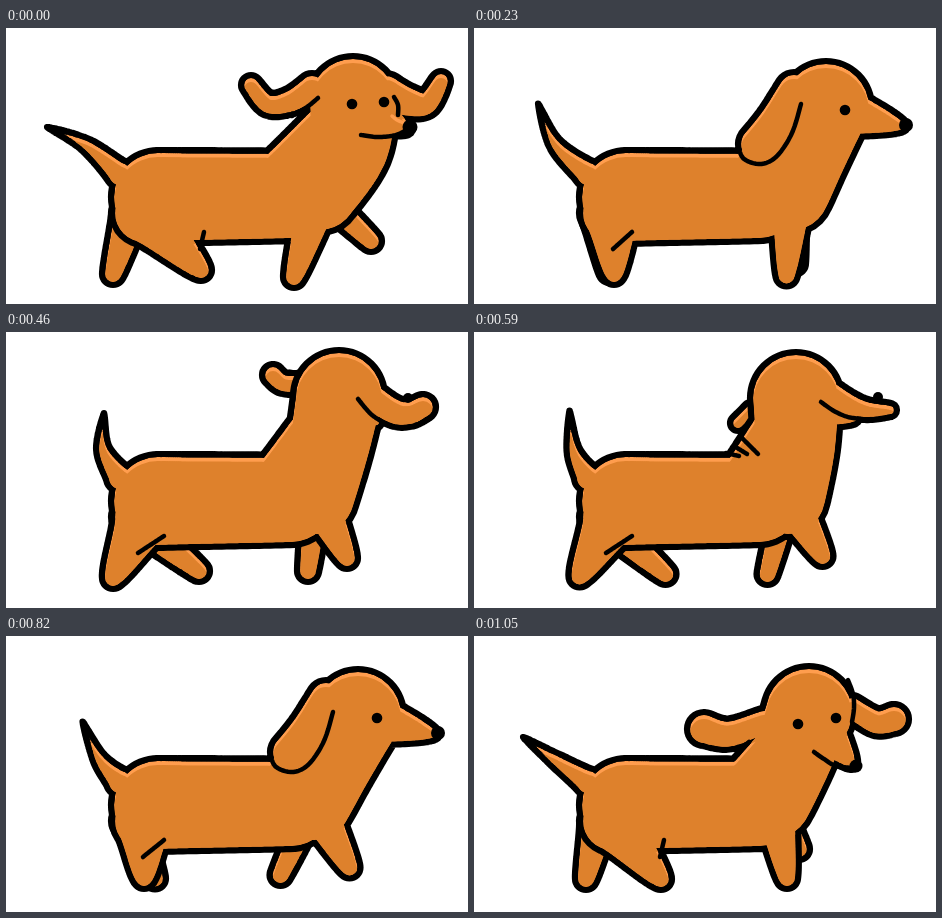
These frames come from a looping animation (462 px wide and 276 px high, 1150 ms). An HTML page with a canvas:

```html
<!DOCTYPE html>
<html lang="en">
<head>
<meta charset="utf-8">
<title>Walking dachshund</title>
<style>
  html, body { margin: 0; width: 100%; height: 100%; overflow: hidden; background: #fff; }
  canvas { display: block; }
</style>
</head>
<body>
<canvas id="stage" width="462" height="276"></canvas>
<script>
const ctx = document.getElementById('stage').getContext('2d');
const COAT = '#de812c', LIGHT = '#ff9d4e', INK = '#000';
const LOOP = 1150, EDGE = 3.1, RIM = 4;

const pts = text => text.split(' ').map(p => p.split(',').map(Number));
const limb = (points, from, to) => ({ points: typeof points === 'string' ? pts(points) : points, from, to });

const TORSO = limb('152,169 285,168', 47, 45);
const TAIL_BASE = [114, 146], NEAR_HIP = [138, 185], FAR_HIP = [125, 185], WITHERS = [272, 165];

// tail: tip and bend; neck: head centre, throat, shoulder; snout: its tip;
// feet: near hind, far hind, near front, far front; dots: x, y, radius.
const pose = ({ tail, neck, feet, snout, ears, behind = [], lines = [], shine = [], dots = [] }) =>
  ({ tail: pts(tail), neck: pts(neck), feet: pts(feet), snout, ears, behind,
     lines: lines.map(pts), shine: shine.map(pts), dots });

const profile = {
  snout: [428, 98],
  ears: [limb('320,62 302,92 284,116', 18, 20)],
  lines: ['264,118 270,131 287,136 303,128 318,105 327,76'],
  dots: [[371, 82, 5.3], [432, 97, 7]]
};

const earsUp = pose({
  tail: '41,99 80,117',
  neck: '347,74 342,120 314,165',
  feet: '195,242 107,246 288,249 365,213',
  snout: [401, 101],
  ears: [limb('306,60 285,73 262,76 245,57', 15, 10), limb('380,65 402,74 421,75 435,53', 20, 10)],
  lines: ['286,88 301,79 312,70', '355,107 372,109 390,107 402,101', '388,69 392,77 392,87'],
  shine: ['386,88 391,92 398,95'],
  dots: [[346, 76, 5.3], [378, 74, 5.3], [404, 99, 7.5]]
});

const earsDown = pose({
  tail: '42,82 74,119',
  neck: '350,78 342,122 310,165',
  feet: '174,246 94,249 287,249 362,226',
  snout: [403, 105],
  ears: [limb('318,62 280,100 257,109', 22, 14), limb('385,70 412,95 432,104', 18, 12)],
  lines: ['245,121 262,125 280,121 295,107 310,84', '352,115 368,119 388,117 402,109', '392,73 395,82 393,92'],
  shine: ['377,91 383,96 391,101'],
  dots: [[347, 86, 5.3], [380, 81, 5.3], [407, 103, 8]]
});

const sideTailUp = pose({
  ...profile,
  tail: '86,69 89,114',
  neck: '352,79 333,125 318,165',
  feet: '106,246 177,239 338,246 280,245'
});

const awayEarsUp = pose({
  tail: '98,81 97,117',
  neck: '333,64 323,115 311,165',
  feet: '107,246 193,239 341,226 302,239',
  snout: [370, 90],
  behind: [limb('295,52 277,51 267,43', 11, 11)],
  ears: [limb('352,55 385,78 403,81 417,75', 16, 13)],
  lines: ['352,67 366,83 384,94'],
  dots: [[402, 66, 5]]
});

const awayEarsDown = pose({
  tail: '93,76 102,121',
  neck: '322,66 321,115 314,165',
  feet: '104,243 190,245 356,222 285,245',
  snout: [380, 86],
  behind: [limb('277,78 264,91', 8, 8)],
  ears: [limb('348,58 385,76 416,78', 16, 7)],
  lines: ['347,70 360,79 374,85 388,87', '252,121 265,124', '260,114 273,122', '268,106 284,122'],
  dots: [[404, 65, 5]]
});

const sideTailDown = pose({
  ...profile,
  tail: '60,95 85,125',
  neck: '352,79 328,125 308,167',
  feet: '172,241 108,240 331,241 264,233'
});

const earsFlapping = pose({
  tail: '49,101 80,123',
  neck: '335,76 315,128 300,165',
  feet: '187,243 112,243 313,242 325,213',
  snout: [378, 128],
  ears: [limb('290,86 255,98 230,93', 14, 17), limb('378,72 402,86 420,83', 13, 15)],
  lines: ['260,114 268,112 275,106', '340,116 350,123 362,130 379,132', '374,44 379,58 380,72 378,86'],
  dots: [[324, 88, 5.3], [362, 82, 5.3], [382, 130, 6.5]]
});

// In-between step: tail and feet halfway, head already turned.
function between(a, b) {
  const half = (p, q) => q.map((point, i) => point.map((v, j) => (p[i][j] + v) / 2));
  return { ...b, tail: half(a.tail, b.tail), feet: half(a.feet, b.feet) };
}

const steps = [
  [0, earsUp], [130, earsDown], [230, between(earsDown, sideTailUp)], [360, sideTailUp],
  [460, awayEarsUp], [590, between(awayEarsUp, awayEarsDown)], [690, awayEarsDown],
  [820, between(awayEarsDown, sideTailDown)], [920, sideTailDown], [1050, earsFlapping]
];

// Point at t (0 to 1) on a smooth curve through all points.
function along(points, t) {
  const last = points.length - 1;
  const i = Math.min(last - 1, Math.floor(t * last)), u = t * last - i;
  const at = k => points[Math.max(0, Math.min(last, k))];
  const [a, b, c, d] = [at(i - 1), at(i), at(i + 1), at(i + 2)];
  return [0, 1].map(k => b[k] + u / 2 * (c[k] - a[k]
    + u * (2 * a[k] - 5 * b[k] + 4 * c[k] - d[k] + u * (3 * (b[k] - c[k]) + d[k] - a[k]))));
}

// Union of tapered limbs, each swept by a circle and grown by a margin.
function sweep(limbs, margin) {
  const path = new Path2D();
  for (const { points, from, to } of limbs) {
    for (let t = 0; t <= 1; t += 1 / 64) {
      const [x, y] = along(points, t), r = from + (to - from) * t + margin;
      if (r <= 0) continue;
      path.moveTo(x + r, y);
      path.arc(x, y, r, 0, 2 * Math.PI);
    }
  }
  return path;
}

// Outline, light rim along the upper edges, coat.
function silhouette(...limbs) {
  const inner = sweep(limbs, -EDGE);
  ctx.fillStyle = INK;
  ctx.fill(sweep(limbs, EDGE));
  ctx.save();
  ctx.clip(inner);
  ctx.fillStyle = LIGHT;
  ctx.fill(inner);
  ctx.translate(0, RIM);
  ctx.fillStyle = COAT;
  ctx.fill(inner);
  ctx.restore();
}

function line(points, color, width) {
  ctx.strokeStyle = color;
  ctx.lineWidth = width;
  ctx.beginPath();
  for (let t = 0; t <= 1; t += 1 / 32) ctx.lineTo(...along(points, t));
  ctx.stroke();
}

function draw({ tail, neck, feet, snout, ears, behind, lines, shine, dots }) {
  const [nearHind, farHind, nearFront, farFront] = feet;
  const [head, , shoulder] = neck;
  ctx.fillStyle = '#fff';
  ctx.fillRect(0, 0, 462, 276);

  silhouette(limb([FAR_HIP, farHind], 20, 11));
  silhouette(limb([shoulder, farFront], 16, 11));
  behind.forEach(ear => silhouette(ear));
  silhouette(
    TORSO,
    limb([...tail, TAIL_BASE], 0, 14),
    limb([NEAR_HIP, nearHind], 32, 11),
    limb([shoulder, nearFront], 25, 11),
    limb([head, WITHERS], 25, 39),
    limb(neck, 46, 40),
    limb([head, snout], 34, 6),
    ...ears
  );

  const crease = [[Math.max(132, nearHind[0] - 1), 221], [Math.max(158, nearHind[0] + 3), 204]];
  [crease, ...lines].forEach(l => line(l, INK, 4.5));
  shine.forEach(l => line(l, LIGHT, 3.5));
  ctx.fillStyle = INK;
  for (const [x, y, r] of dots) {
    ctx.beginPath();
    ctx.arc(x, y, r, 0, 2 * Math.PI);
    ctx.fill();
  }
}

ctx.lineCap = ctx.lineJoin = 'round';
const start = performance.now();
function tick() {
  const t = (performance.now() - start) % LOOP;
  draw(steps.filter(([from]) => from <= t).pop()[1]);
  requestAnimationFrame(tick);
}
tick();
</script>
</body>
</html>
```
